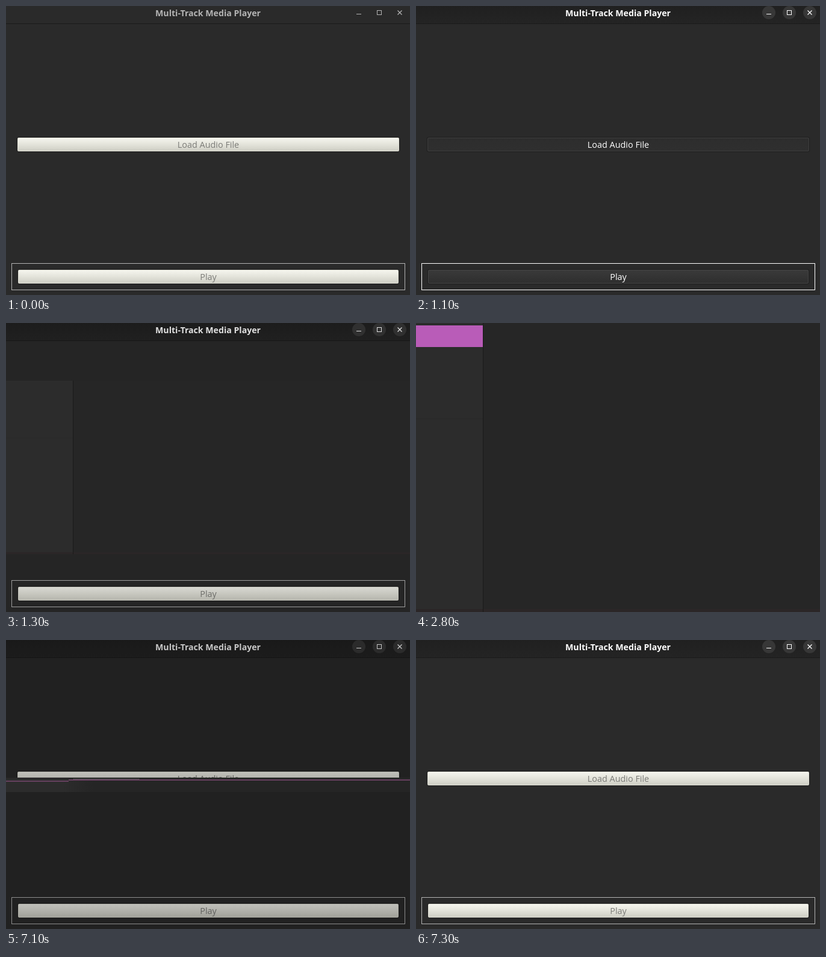
These frames come from a looping animation (671 px wide and 481 px high, 8 s). An HTML page with a canvas:

```html
<!DOCTYPE html>
<html lang="en">
<head>
<meta charset="utf-8">
<title>Media player</title>
<style>
  html, body { margin: 0; width: 100%; height: 100%; overflow: hidden; background: #2a2a2a; }
  canvas { display: block; }
</style>
</head>
<body>
<canvas id="stage" width="671" height="481"></canvas>
<script>
const W = 671, H = 481, LOOP = 8000;
const ctx = document.getElementById('stage').getContext('2d', { alpha: false });
const FAMILY = '"Open Sans", "Noto Sans", sans-serif';
const BODY = '500 14.4px', BOLD = 'bold 14.15px';

function box(x, y, w, h, fill) {
  ctx.fillStyle = fill;
  ctx.fillRect(x, y, w, h);
}

function round(x, y, w, h, r, fill) {
  ctx.fillStyle = fill;
  ctx.beginPath();
  ctx.roundRect(x, y, w, h, r);
  ctx.fill();
}

function fade(x0, y0, x1, y1, ...colors) {
  const g = ctx.createLinearGradient(x0, y0, x1, y1);
  colors.forEach((c, i) => g.addColorStop(i / (colors.length - 1), c));
  return g;
}

function text(s, x, y, color, font = BODY, align = 'center') {
  ctx.font = `${font} ${FAMILY}`;
  ctx.textAlign = align;
  ctx.fillStyle = color;
  ctx.fillText(s, x, y);
}

function button(label, x, y, w, look, color) {
  const [edge, top, mid, low] = look;
  round(x - 1, y - 1, w + 2, 25, 3, '#1d1d1d');
  round(x, y, w, 23, 2, edge);
  round(x + 1, y + 1, w - 2, 21, 1, fade(0, y, 0, y + 23, top, mid, low));
  text(label, 336, y + 17, color);
}

const LIGHT = ['#dcdcd2', '#f7f7f0', '#e3e3da', '#cdcdc3'];
const DARK = ['#464646', '#3a3a3a', '#343434', '#2e2e2e'];
const PRESSED = ['#404040', '#2d2d2d', '#2e2e2e', '#2f2f2f'];

function titleBar(active) {
  const ink = active ? '#ffffff' : '#b4b4b4';
  if (active) box(0, 0, W, 29, fade(0, 0, 0, 29, '#202020', '#242424'));
  box(0, 29, W, 1, '#1a1a1a');
  text('Multi-Track Media Player', 335.5, 17, ink, BOLD);
  if (active) for (const x of [586, 620, 654]) {
    ctx.fillStyle = '#373737';
    ctx.beginPath();
    ctx.arc(x, 11, 11, 0, 7);
    ctx.fill();
  }
  box(582, 13, 8, 1, ink);
  ctx.strokeStyle = ink;
  ctx.lineWidth = 1;
  ctx.strokeRect(616.5, 7.5, 7, 7);
  ctx.lineWidth = 1.3;
  ctx.beginPath();
  ctx.moveTo(650.5, 7.5); ctx.lineTo(657.5, 14.5);
  ctx.moveTo(657.5, 7.5); ctx.lineTo(650.5, 14.5);
  ctx.stroke();
}

function player({ active = false, load = LIGHT, play = LIGHT, hover = '', dim = 0 }) {
  const ink = (name, look) => look !== LIGHT ? '#ffffff' : hover === name ? '#5c5c5c' : '#7c7c78';
  box(0, 0, W, H, '#2a2a2a');
  titleBar(active);
  ctx.lineWidth = 1;
  ctx.strokeStyle = play === LIGHT ? '#b4b4b4' : '#ffffff';
  ctx.strokeRect(9.5, 428.5, 653, 44);
  button('Load Audio File', 19, 219, 634, load, ink('load', load));
  button('Play', 20, 439, 632, play, ink('play', play));
  if (dim) box(0, 0, W, H, `rgba(0,0,0,${dim})`);
}

function folder(name, y) {
  round(121, y - 8, 7, 5, 1, '#b65bb3');
  round(121, y - 6, 14, 4, 1, '#b65bb3');
  round(121, y - 5, 14, 11, 1, '#757575');
  box(128, y - 5, 6, 1, '#4a3a4a');
  text(name, 144, y + 6, '#ffffff', BODY, 'left');
}

function dialog(files, selected) {
  box(0, 0, W, H, '#262626');
  box(0, 0, 111, H, '#2c2c2c');
  box(0, 159, 111, 1, '#272727');
  box(111, 0, 1, H, '#191919');
  box(0, 476, W, 5, '#2b2627');
  box(111, 476, 1, 5, '#191919');
  if (files) ['__pycache__', 'models', 'assets'].forEach((name, i) => folder(name, 8 + 23 * i));
  if (selected) box(0, 4, 111, 36, '#b95cb8');
}

function growingDialog(scale) {
  ctx.save();
  ctx.translate(0, 240);
  ctx.scale(1, scale);
  ctx.translate(0, -240);
  dialog(false, false);
  ctx.restore();
}

// The dialog squeezed into a thin strip as it closes
function collapsedDialog() {
  box(0, 229, W, 24, fade(95, 0, 145, 0, '#2c2c2c', '#252525'));
  box(0, 229, W, 2, '#272727');
  box(0, 234, 104, 2, '#66405f');
  box(104, 232, W - 104, 2, '#66405f');
  for (let x = 112; x < 222; x += 2) box(x, 231, 1, 1, '#8c8c8c');
}

function draw(t) {
  if (t < 1100) {
    player({ hover: t >= 900 ? 'load' : t >= 400 && t < 700 ? 'play' : '' });
  } else if (t < 1300) {
    player({ active: true, load: t < 1200 ? PRESSED : DARK, play: DARK });
  } else if (t < 1400) {
    player({ active: true, dim: 0.12 });
    growingDialog(0.6);
  } else if (t < 7100) {
    dialog(t >= 1500 && t < 2800, t >= 2800);
  } else {
    player({ active: true, dim: t < 7200 ? 0.22 : t < 7300 ? 0.11 : 0 });
    if (t < 7200) collapsedDialog();
  }
}

function tick() {
  draw(performance.now() % LOOP);
  requestAnimationFrame(tick);
}
tick();
</script>
</body>
</html>
```
